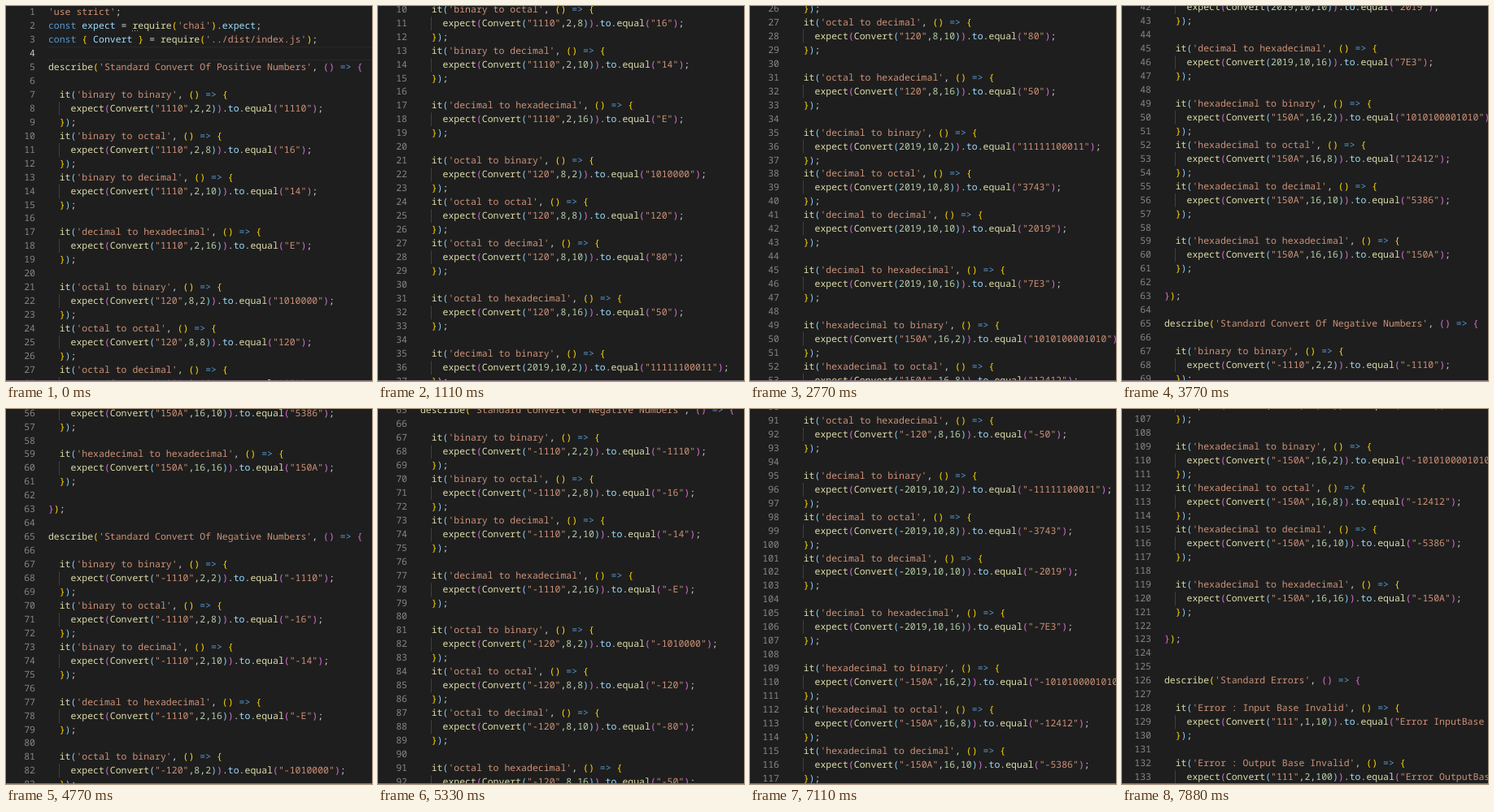
These frames come from a looping animation (450 px wide and 462 px high, 8 s). An HTML page:

```html
<!DOCTYPE html>
<html lang="en">
<head>
<meta charset="utf-8">
<title>Scrolling test file</title>
<style>
  html, body { margin: 0; width: 100%; height: 100%; overflow: hidden; background: #1e1e1e; }
  #stage { position: relative; width: 450px; height: 462px; overflow: hidden; }
  #stage::after {
    content: ""; position: absolute; left: 0; bottom: 0; width: 100%; height: 1px;
    background: #80707a;
  }
  #code {
    position: absolute; left: 0; top: 0.2px; width: 450px;
    font: 500 11.5px/16.96px "Noto Sans Mono", "DejaVu Sans Mono", monospace;
    font-variant-ligatures: none; text-rendering: geometricPrecision;
    white-space: pre; color: #d4d4d4;
  }
  .line { position: relative; height: 16.96px; padding-left: 51.9px; }
  .num { position: absolute; left: 0; width: 36px; text-align: right; color: #858585; }
  .guide { position: absolute; left: 65px; top: -1px; width: 1px; height: 17px; background: #404040; }
  .current::after {
    content: ""; position: absolute; left: 52px; right: 0; top: -1px; bottom: 1px;
    box-sizing: border-box; border: solid #282828; border-width: 1px 0;
  }
  .current .num { color: #c6c6c6; }
  .hint {
    position: absolute; left: 155px; top: 13px; width: 7px; height: 1px;
    background: repeating-linear-gradient(90deg, #a0a0a0 0 1px, transparent 1px 3px);
  }
  .str { color: #ce9178; }
  .key { color: #569cd6; }
  .fn { color: #dcdcaa; }
  .var { color: #9cdcfe; }
  .int { color: #b5cea8; }
  .b0 { color: #ffd700; }
  .b1 { color: #da70d6; }
  .b2 { color: #87cefa; }
</style>
</head>
<body>
<div id="stage"><div id="code"></div></div>
<script>
const LOOP = 8000;
const NOTCH = 38.95;
// One entry per wheel notch; a repeated time is a double notch.
const notches = [
  220, 550, 880, 1110, 1330, 1550, 1770, 1880, 2110, 2330,
  2770, 2880, 3000, 3110, 3220, 3550, 3660, 3770, 3880, 4220,
  4440, 4440, 4660, 4770, 5000, 5110, 5220, 5330, 5660, 5660,
  5880, 6000, 6330, 6330, 6440, 6550, 6660, 6770,
  7110, 7220, 7330, 7440, 7660, 7660, 7770, 7880
];

const baseNames = { 2: 'binary', 8: 'octal', 10: 'decimal', 16: 'hexadecimal' };
const inputs = [['1110', 2], ['120', 8], ['2019', 10], ['150A', 16]];

const test = (title, args, result) => [
  `  it('${title}', () => {`,
  `    expect(Convert(${args})).to.equal("${result}");`,
  '  });'
];

function suite(kind, sign) {
  const out = [`describe('Standard Convert Of ${kind} Numbers', () => {`, ''];
  for (const [value, from] of inputs) {
    for (const to of [2, 8, 10, 16]) {
      // The file under test mislabels this one case.
      const name = from === 2 && to === 16 ? 'decimal' : baseNames[from];
      const arg = from === 10 ? sign + value : `"${sign}${value}"`;
      const result = sign + parseInt(value, from).toString(to).toUpperCase();
      out.push(...test(`${name} to ${baseNames[to]}`, `${arg},${from},${to}`, result));
      if (to >= 10) out.push('');
    }
  }
  return [...out, '});', ''];
}

const lines = [
  "'use strict';",
  "const expect = require('chai').expect;",
  "const { Convert } = require('../dist/index.js');",
  '',
  ...suite('Positive', ''),
  ...suite('Negative', '-'),
  '',
  "describe('Standard Errors', () => {",
  '',
  ...test('Error : Input Base Invalid', '"111",1,10', 'Error InputBase Invalid'),
  '',
  ...test('Error : Output Base Invalid', '"111",2,100', 'Error OutputBase Invalid')
];

let depth = 0;

function tokenClass(token, next) {
  if (/^['"]/.test(token)) return 'str';
  if (token === 'const' || token === '=>') return 'key';
  if (/^\d/.test(token)) return 'int';
  if (/^\w/.test(token)) return next === '(' ? 'fn' : 'var';
  if (/[({]/.test(token)) return 'b' + depth++ % 3;
  if (/[)}]/.test(token)) return 'b' + --depth % 3;
  return '';
}

function add(parent, className, text = '') {
  const el = document.createElement('span');
  el.className = className;
  el.textContent = text;
  parent.append(el);
}

function addLine(text, i) {
  const row = document.createElement('div');
  row.className = i === 3 ? 'line current' : 'line';
  add(row, 'num', i + 1);
  if (text.startsWith('    ')) add(row, 'guide');
  for (const m of text.matchAll(/'[^']*'|"[^"]*"|=>|\w+|\s+|./g)) {
    add(row, tokenClass(m[0], text[m.index + m[0].length]), m[0]);
  }
  if (i === 1) add(row, 'hint');
  code.append(row);
}

const code = document.getElementById('code');
lines.forEach(addLine);

const start = performance.now();
function draw() {
  const t = (performance.now() - start) % LOOP;
  const count = notches.filter(at => at <= t).length;
  code.style.transform = `translateY(${-count * NOTCH}px)`;
  requestAnimationFrame(draw);
}
draw();
</script>
</body>
</html>
```
